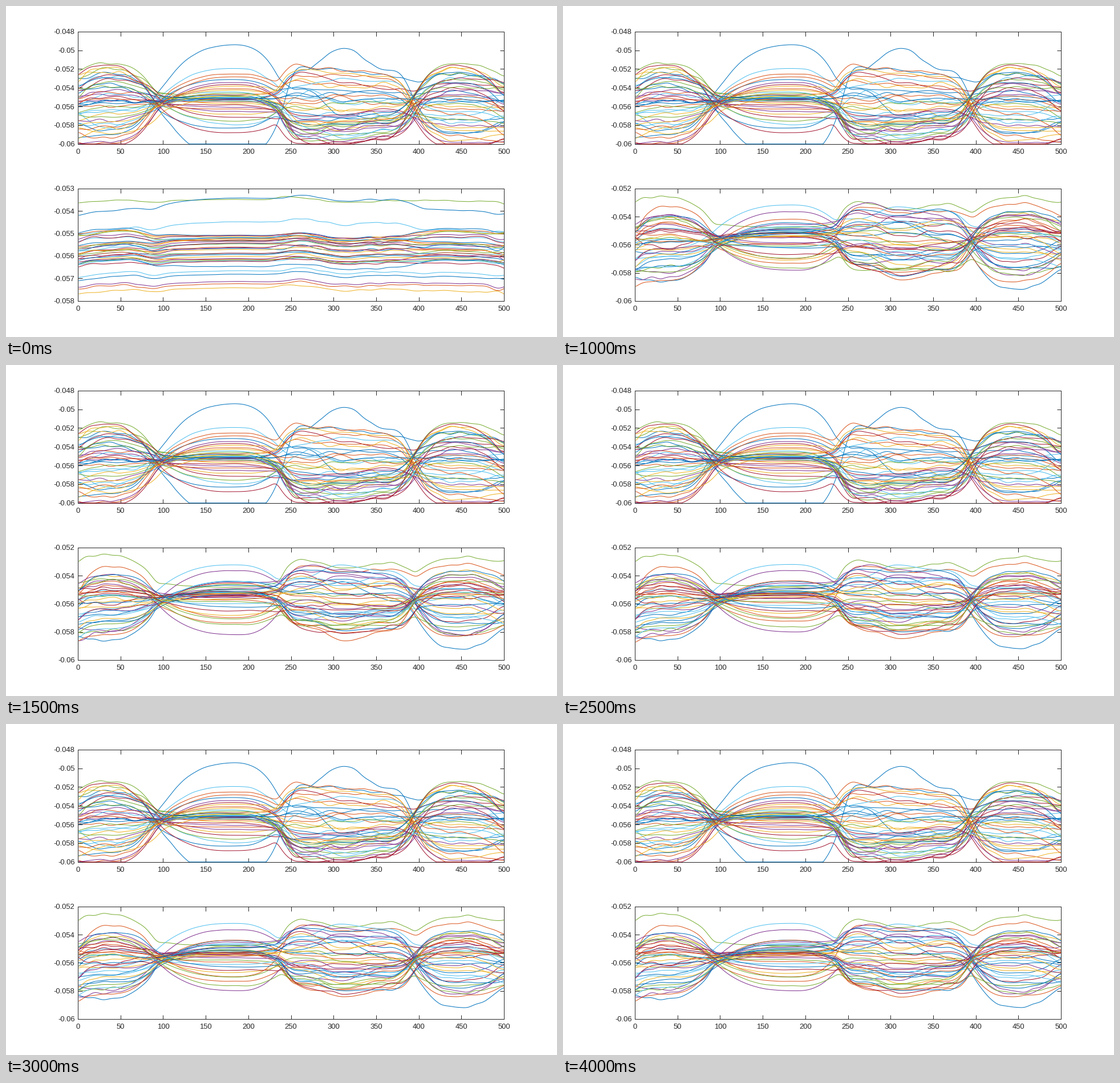
A matplotlib script that plays this animation: 966 px wide and 580 px high, repeating every 4500 ms.

```python
import numpy as np
import matplotlib.pyplot as plt
from matplotlib.animation import FuncAnimation
from matplotlib.collections import LineCollection

plt.rcParams["font.family"] = "Liberation Sans"
W, H, DPI = 966, 580, 100
PX = 72 / DPI
INK = "#262626"
COLORS = np.array(["#0072BD", "#D95319", "#EDB120", "#7E2F8E",
                   "#77AC30", "#4DBEEE", "#A2142F"])
BLUE, ORANGE, YELLOW, PURPLE, GREEN, CYAN, RED = COLORS
x = np.arange(1, 501)

# Curves run through levels at these places; a dome ends at each crossing.
KEYS = [0, 35, 93, 185, 237, 265, 310, 360, 395, 445, 500]
CROSSINGS = {0, 2, 4, 8, 10}

# Levels are thousandths below zero, at the keys that are not inner crossings.
TOP_BAND = np.array([[53.2, 51.6, 52.5, 51.7, 52.1, 52.5, 51.7, 53.5],
                     [55.9, 55.4, 55.1, 57.3, 57.2, 56.9, 55.2, 55.9],
                     [60.3, 60.3, 58.8, 60.0, 60.2, 59.5, 60.5, 60.2]])
TOP_LEADERS = {
    "peak": (BLUE, [57.5, 58.6, 49.45, 54.2, 56.8, 57.4, 57.5, 57.2]),
    "late peak": (BLUE, [55.6, 55.5, 55.3, 52.2, 49.6, 52.0, 58.9, 57.6]),
    "trough": (BLUE, [53.2, 52.5, 61.5, 51.7, 52.2, 52.7, 52.5, 54.0]),
    "shoulder": (CYAN, [56.8, 58.1, 51.9, 55.2, 55.4, 55.5, 55.5, 57.0]),
    "rim": (GREEN, [52.8, 51.3, 55.4, 58.4, 58.0, 57.8, 51.4, 52.9])}

LOW_BAND = np.array([[54.6, 53.9, 54.4, 53.3, 53.6, 53.7, 53.7, 54.4],
                     [55.8, 55.6, 55.3, 56.1, 56.4, 56.3, 55.4, 55.8],
                     [58.7, 58.3, 58.0, 57.9, 58.3, 58.0, 58.4, 57.6]])
LOW_LEADERS = {
    "rim": (GREEN, [52.5, 52.6, 54.8, 53.0, 53.35, 53.2, 52.7, 52.95]),
    "second rim": (ORANGE, [54.6, 53.4, 57.0, 53.4, 53.55, 53.6, 53.15, 54.1]),
    "peak": (CYAN, [57.0, 56.3, 53.2, 54.2, 53.2, 53.6, 54.9, 56.0]),
    "shoulder": (PURPLE, [57.7, 57.8, 53.65, 54.8, 54.0, 54.2, 58.2, 56.8]),
    "floor": (BLUE, [58.3, 58.6, 54.4, 55.0, 54.4, 55.6, 59.15, 57.7])}


def mix(a, b, t):
    return a + (b - a) * t


def bump(center, width):
    return np.exp(-((x - center) / width) ** 2)


def smooth(rows, sigma):
    r = 4 * sigma
    k = np.exp(-0.5 * (np.arange(-r, r + 1) / sigma) ** 2)
    return np.array([np.convolve(np.pad(row, r, mode="edge"), k / k.sum(),
                                 "valid") for row in rows])


def ease(t, k):
    """Rise from a crossing, fall to one, or glide between two levels."""
    if k in CROSSINGS:
        return 1 - (1 - t) ** 2.6
    if k + 1 in CROSSINGS:
        return t ** 2.6
    return t * t * (3 - 2 * t)


def trace(levels, pull, shift):
    """Join each line's levels into domes that meet at the crossings."""
    s, a, b, c, d, e, f, g = levels.T
    p = mix((a + b) / 2, 55.9, pull)
    q = mix((b + c) / 2, 55.4, pull)
    r = mix((e + f) / 2, 55.4, pull)
    vals = np.array([s, a, p, b, q, c, d, e, r, f, g])[:, :, None]
    rows = np.empty((len(levels), len(x)))
    for k, (start, end) in enumerate(zip(KEYS, KEYS[1:])):
        part = (x >= start) & (x <= end)
        t = (x[part] - start) / (end - start)
        rows[:, part] = mix(vals[k], vals[k + 1], ease(t, k))
    rows = [np.interp(x + dx, x, row) for dx, row in zip(shift, rows)]
    return smooth(rows, 3)


def bulk(n, band, rng):
    """Fill a band with lines whose order turns over between domes."""
    noise = lambda size: rng.normal(0, size, n)
    a = rng.permutation(np.linspace(-1, 1, n))
    b = -a + noise(.45)
    c = .5 * b + noise(.6)
    scores = [a + noise(.1), a, b, c + noise(.15), c, c + noise(.1),
              a + noise(.15), a + noise(.25)]
    levels = []
    for k, (score, (low, mid, high)) in enumerate(zip(scores, band.T)):
        u = np.argsort(np.argsort(score)) / (n - 1) * 2 - 1
        power = 2.4 if k == 2 else 1.15
        reach = np.where(u > 0, high - mid, mid - low)
        levels.append(mid + reach * np.sign(u) * np.abs(u) ** power)
    return np.array(levels).T


def ripple(n, amp, rng):
    """Small shared wobbles, weak along the second dome."""
    modes = smooth(rng.normal(size=(3, len(x))), 6)
    modes /= modes.std(axis=1, keepdims=True)
    calm = 1 - .8 * np.clip((x - 90) / 25, 0, 1) * np.clip((240 - x) / 25, 0, 1)
    return amp * calm * (rng.normal(size=(n, 3)) @ modes + .6 * modes[0])


def family(leaders, n, band, rng):
    colors, levels = zip(*leaders.values())
    return (np.r_[colors, COLORS[np.arange(n) % 7]],
            np.vstack([levels, bulk(n, band, rng)]))


def segments(rows):
    return [np.column_stack([x, -row / 1000]) for row in rows]


def top_panel():
    rng = np.random.default_rng(12)
    colors, levels = family(TOP_LEADERS, 38, TOP_BAND, rng)
    n = len(levels)
    rows = trace(levels, .4, rng.normal(0, 3, n)) + ripple(n, .05, rng)
    return segments(np.minimum(rows, 60)), colors


def flat_panel():
    rng = np.random.default_rng(8)
    n = 29
    singles = [53.53, 53.75, 54.7, 56.75, 56.9, 57.23, 57.33, 57.5]
    colors = np.r_[[GREEN, BLUE, CYAN, CYAN, BLUE, PURPLE, ORANGE, YELLOW],
                   COLORS[np.arange(n) % 7]]
    base = np.r_[singles, np.linspace(54.97, 56.35, n)]
    tilt = np.r_[0, .27, .17, np.full(5, .04), rng.normal(0, .09, n)]
    side = np.array([1, 1, -1, -1, -1, -1, 1, 1])
    rows = trace(base[:, None] + tilt[:, None] * side, 0, np.zeros(len(base)))
    wave = (.12 * bump(0, 20) - .06 * bump(55, 18) + .1 * bump(90, 15)
            - .05 * bump(185, 45) - .16 * bump(258, 24) + .08 * bump(315, 28)
            - .04 * bump(430, 16) + .09 * bump(500, 22))
    return segments(rows + wave + ripple(len(base), .013, rng)), colors


def fan_panels(count):
    """Fans that settle a little more with every step."""
    rng = np.random.default_rng(5)
    colors, levels = family(LOW_LEADERS, 36, LOW_BAND, rng)
    n = len(levels)
    shift = rng.normal(0, 2, n)
    wobble = ripple(n, .04, rng)
    weight = np.where(np.arange(n) < len(LOW_LEADERS), .3, 1)[:, None]
    for i in range(count):
        gain = 1.1 if i == 0 else 1
        drift = .28 * .6 ** i * weight * rng.normal(size=levels.shape)
        rows = trace(55.6 + (levels - 55.6) * gain + drift, .35, shift)
        yield segments(rows + wobble), colors


def panel(top):
    left, right, height = 126, 873, 197
    ax = fig.add_axes([left / W, 1 - (top + height) / H,
                       (right - left) / W, height / H])
    ax.set_xlim(0, 500)
    ax.set_xticks(range(0, 501, 50))
    ax.tick_params(direction="in", top=True, right=True, length=7.5 * PX,
                   width=PX, color=INK, labelcolor=INK, labelsize=13 * PX)
    ax.tick_params(axis="x", pad=8.5 * PX)
    ax.tick_params(axis="y", pad=5.5 * PX)
    for side in ax.spines.values():
        side.set(linewidth=PX, edgecolor=INK)
    lines = LineCollection([], linewidths=PX, zorder=3, clip_on=False)
    ax.add_collection(lines, autolim=False)
    return ax, lines


def set_range(ax, low, high, step):
    ticks = np.arange(low, high + 1, step)
    ax.set_ylim(-high / 1000, -low / 1000)
    ax.set_yticks(-ticks / 1000, [f"{-t / 1000:g}" for t in ticks])


def show(lines, content):
    lines.set_segments(content[0])
    lines.set_color(content[1])


fig = plt.figure(figsize=(W / DPI, H / DPI), dpi=DPI, facecolor="white")
top_ax, top_lines = panel(44.8)
low_ax, low_lines = panel(319.8)
set_range(top_ax, 48, 60, 2)
show(top_lines, top_panel())
STEPS = [flat_panel(), *fan_panels(8)]


def update(i):
    if i == 0:
        set_range(low_ax, 53, 58, 1)
    else:
        set_range(low_ax, 52, 60, 2)
    show(low_lines, STEPS[i])
    return [low_lines]


anim = FuncAnimation(fig, update, frames=len(STEPS), interval=500, repeat=True,
                     repeat_delay=0, blit=False)
plt.show()
```
